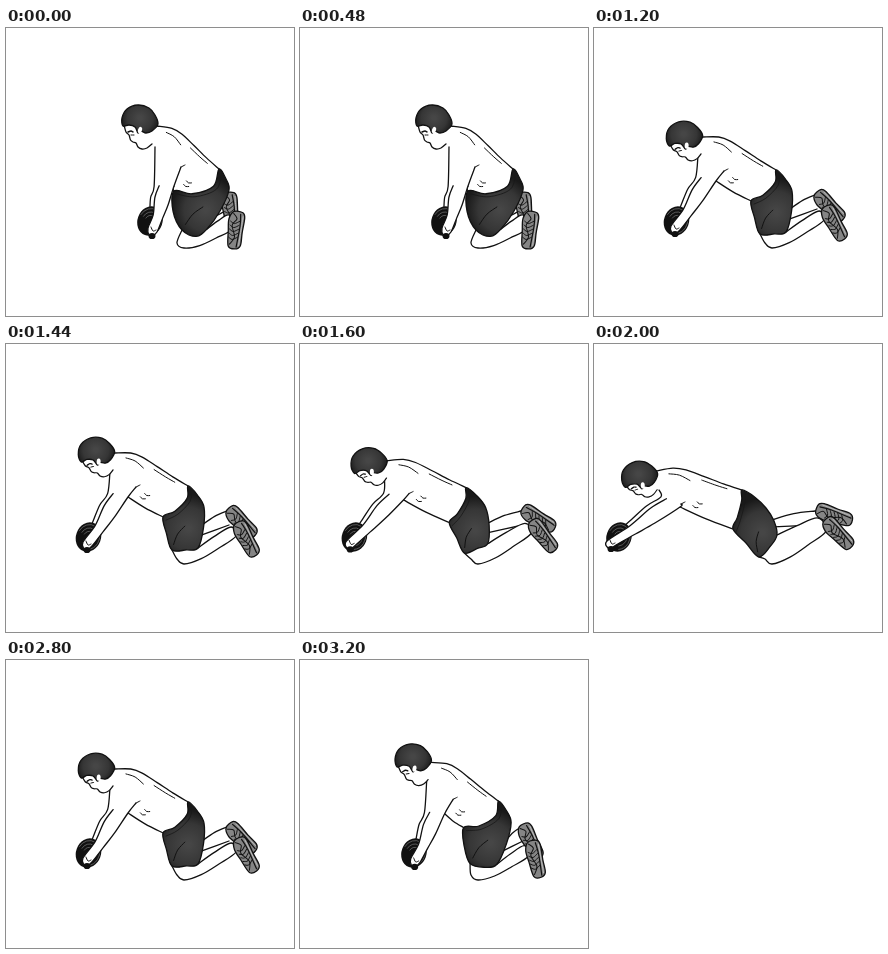
Animation of 288 by 288 pixels, one loop 3600 ms. Source, as an HTML page with a canvas:

```html
<!DOCTYPE html>
<html lang="en">
<head>
<meta charset="utf-8">
<title>Ab wheel rollout</title>
<style>
  html, body { margin: 0; width: 100%; height: 100%; overflow: hidden; background: #fff; }
  canvas { display: block; width: 100vw; height: 100vh; }
</style>
</head>
<body>
<canvas id="stage"></canvas>
<script>
const SIZE = 288, STEP = 400;
const INK = '#111';
const canvas = document.getElementById('stage');
const ctx = canvas.getContext('2d');

// How far the wheel has rolled out during each step of the loop.
const REACH = [0, 0, 0.24, 0.5, 0.74, 1, 1, 0.5, 0.24];

// Parabola through start, middle and end of the rollout.
const blend = (s, a, m, b) =>
  a * (1 - s) * (1 - 2 * s) + m * 4 * s * (1 - s) + b * s * (2 * s - 1);

const shift = ([x, y], dx, dy) => [x + dx, y + dy];

// Point at fraction u between a and b, pushed v pixels sideways.
function along(a, b, u, v = 0) {
  const dx = b[0] - a[0], dy = b[1] - a[1], len = Math.hypot(dx, dy);
  return [a[0] + dx * u + dy / len * v, a[1] + dy * u - dx / len * v];
}

const span = (a, b, ...offsets) => offsets.map(([u, v]) => along(a, b, u, v));

function curve(p, closed) {
  const n = p.length;
  const at = i => closed ? p[(i + n) % n] : p[Math.max(0, Math.min(n - 1, i))];
  const path = new Path2D();
  path.moveTo(...p[0]);
  for (let i = 0; i < (closed ? n : n - 1); i++) {
    const [a, b, c, d] = [at(i - 1), at(i), at(i + 1), at(i + 2)];
    path.bezierCurveTo(
      b[0] + (c[0] - a[0]) / 6, b[1] + (c[1] - a[1]) / 6,
      c[0] - (d[0] - b[0]) / 6, c[1] - (d[1] - b[1]) / 6, ...c);
  }
  if (closed) path.closePath();
  return path;
}

function line(points, width = 1.3, color = INK) {
  ctx.lineWidth = width;
  ctx.strokeStyle = color;
  ctx.stroke(curve(points));
}

function skin(points) {
  ctx.fillStyle = '#fff';
  ctx.fill(curve(points));
  line(points);
}

function shape(points, fill) {
  const path = curve(points, true);
  ctx.fillStyle = fill;
  ctx.fill(path);
  ctx.lineWidth = 1.3;
  ctx.strokeStyle = INK;
  ctx.stroke(path);
}

function oval([x, y], rx, ry, fill, tilt = 0) {
  ctx.fillStyle = fill;
  ctx.beginPath();
  ctx.ellipse(x, y, rx, ry, tilt, 0, Math.PI * 2);
  ctx.fill();
}

function cloth([x, y], r) {
  const g = ctx.createRadialGradient(x, y, 2, x, y, r);
  g.addColorStop(0, '#464646');
  g.addColorStop(0.6, '#363636');
  g.addColorStop(1, '#191919');
  return g;
}

function placed([x, y], degrees, draw) {
  ctx.save();
  ctx.translate(x, y);
  ctx.rotate(degrees * Math.PI / 180);
  draw();
  ctx.restore();
}

function head(at, degrees, depth) {
  placed(at, degrees, () => {
    ctx.save();
    ctx.scale(1, depth);
    skin([[-16, 6], [-14, 13], [-11, 16], [-9.5, 21], [-7, 23], [-4, 24], [-2, 28], [2, 30], [7, 29], [12, 25]]);
    line([[-12, 13], [-9, 12], [-7, 13]], 1.5);
    line([[-9, 16], [-6, 16]], 1);
    ctx.restore();
    shape([[-17, 7], [-18, -1], [-13, -10], [-2, -14], [9, -11], [15, -4], [18, 5], [12, 12],
      [6, 14], [1, 12], [-2, 14], [-5, 8], [-11, 6]], cloth([0, -1], 20));
    oval([0, 11], 2, 3.2, '#fff', 0.3);
  });
}

// Heel at the origin, toe along +x, sole on the -y side.
function shoe(at, degrees) {
  placed(at, degrees, () => {
    shape([[0, -5], [5, -7.5], [20, -7], [33, -7], [37, -2], [35, 5], [20, 7], [8, 8], [0, 4]], '#858585');
    line([[2, -3], [14, -4], [35, -3]], 1.2);
    line([[4, -5.7], [18, -5.5], [33, -5.2]], 0.8, '#c4c4c4');
    line([[2, 4], [7, 0], [14, 4], [25, 0], [33, 4]], 1);
    for (let x = 9; x < 28; x += 4) line([[x, -3], [x + 3, 2], [x + 1, 6]], 0.9);
  });
}

function wheel([x, y]) {
  oval([x, y], 12.5, 15, INK, 0.35);
  ctx.lineWidth = 0.7;
  ctx.strokeStyle = '#777';
  for (let r = 5; r < 12; r += 3) {
    ctx.beginPath();
    ctx.ellipse(x, y, r, r * 1.15, 0.35, -2.9, 1.2);
    ctx.stroke();
  }
}

function athlete(s) {
  const mix = (a, m, b) => blend(s, a, m, b);
  const joint = (a, m, b) => [mix(a[0], m[0], b[0]), mix(a[1], m[1], b[1])];

  const skull = joint([134, 91], [90, 107], [45, 131]);
  const nape = joint([151, 98], [109, 109], [62, 127]);
  const throat = joint([149, 119], [104, 127], [65, 146]);
  const armpit = joint([175, 139], [130, 143], [87, 160]);
  const chest = joint([168, 158], [122, 153], [86, 163]);
  const waist = joint([213, 141], [182, 142], [148, 146]);
  const belly = joint([168, 163], [157, 173], [139, 185]);
  const seat = joint([223, 162], [198, 163], [172, 164]);
  const hemFront = joint([176, 202], [166, 206], [165, 213]);
  const hemBack = joint([201, 201], [192, 204], [183, 191]);
  const ankle = joint([226, 201], [230, 192], [232, 187]);
  const heel = joint([223, 187], [225, 183], [224, 174]);
  const hub = joint([146, 208], [81, 206], [17, 205]);
  const wrist = shift(hub, 5, -4);
  const knee = [178, 220];
  const farHeel = [223, 165];

  // Legs and shoes
  const hamstring = along(seat, hemBack, 0.45);
  skin([hamstring, along(hamstring, farHeel, 0.5, 1), shift(farHeel, -2, 2)]);
  line([along(seat, hemBack, 0.7), shift(farHeel, 0, 16)]);
  shoe(farHeel, mix(85, 47, 20));
  skin([hemBack, along(hemBack, heel, 0.5, 1), heel, ankle,
    ...span(knee, ankle, [0.65, -2.5], [0.3, -3.5]), knee, shift(knee, -7, -5), hemFront]);
  shoe([232, mix(184, 179, 176)], mix(98, 63, 48));

  // Torso
  line([nape, ...span(nape, waist, [0.18, 6.5], [0.33, 7.5], [0.55, 5], [0.78, 2]), waist]);
  line(span(nape, waist, [0.15, 0], [0.27, 1], [0.4, -2]), 1);
  line(span(nape, waist, [0.53, 1], [0.7, -1], [0.83, -2]), 1);
  line([chest, along(chest, belly, 0.5, -1), belly]);
  for (const u of [0.2, 0.28]) {
    const rib = along(chest, waist, u, u * 30 - 8);
    line([rib, shift(rib, 2, 2), shift(rib, 5, 2)], 1);
  }

  // Shorts
  const sag = -mix(13, 7, 2);
  const band = [belly, ...span(belly, waist, [0.3, sag * 0.8], [0.75, sag])];
  shape([waist, along(waist, seat, 0.5, 2), seat, along(seat, hemBack, 0.5, 2.5), hemBack,
    along(hemFront, hemBack, 0.55, -mix(7, 1, 2)), hemFront,
    along(belly, hemFront, 0.5, -mix(5, 1, 0)), ...band],
    cloth(along(hemFront, seat, 0.5), 34));
  line([...band, waist].map(p => shift(p, 3, 3)), 0.8, '#181818');
  line(span(hemFront, seat, [0.1, 2], [0.3, 5], [0.5, 4]), 1);

  // Arms and wheel
  skin([throat, ...span(chest, wrist, [0.15, -18.5], [0.38, -18], [0.65, -14], [0.85, -11])]);
  wheel([mix(144, 82.5, 25), 193]);
  skin([...span(chest, wrist, [0.1, -14], [0.35, -14], [0.7, -9.5]), shift(hub, -4, -8), shift(hub, -3, -1),
    hub, wrist, ...span(chest, wrist, [0.7, 0.5], [0.4, 1]), chest, armpit]);
  line([armpit, shift(armpit, 4, -2)], 1);
  line([shift(hub, -1, -9), shift(hub, 1, -5), shift(hub, 4, -6)], 1);
  oval(hub, 3.5, 3.1, INK);

  head(skull, mix(0, -14, -20), mix(1, 0.9, 0.8));
}

function render() {
  const dpr = window.devicePixelRatio || 1;
  const w = Math.round(innerWidth * dpr), h = Math.round(innerHeight * dpr);
  if (canvas.width !== w || canvas.height !== h) {
    canvas.width = w;
    canvas.height = h;
  }
  ctx.setTransform(w / SIZE, 0, 0, h / SIZE, 0, 0);
  ctx.lineCap = ctx.lineJoin = 'round';
  ctx.fillStyle = '#fff';
  ctx.fillRect(0, 0, SIZE, SIZE);
  athlete(REACH[Math.floor(performance.now() / STEP) % REACH.length]);
  requestAnimationFrame(render);
}
render();
</script>
</body>
</html>
```
